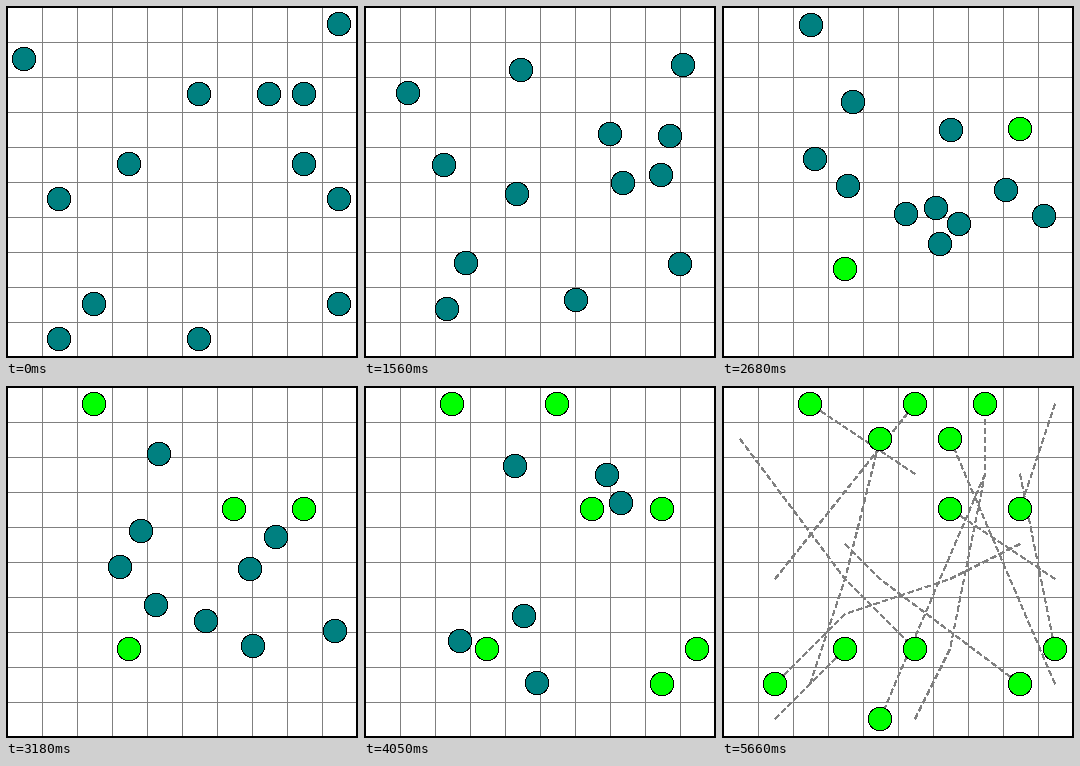
Recreate the animation shown at these times as a matplotlib script. Size 352 px wide and 352 px high, loop 8570 ms.

```python
import numpy as np
import matplotlib.pyplot as plt
from matplotlib.animation import FuncAnimation
from matplotlib.collections import LineCollection

SIZE, DPI, CELL, CELLS = 352, 88, 35, 10
PX = 72 / DPI            # one pixel in points
LOOP, TICK = 8570, 10    # ms
START, WALK = 980, 4350  # ms, pause before the walk and its length
PATHS_AT = 5660          # ms, when the routes appear
STRIDE = 2.393           # pixels walked per step
GRAY, TEAL, LIME = "#808080", "#008080", "#00ff00"

# Start, turning points and goal of each agent as (column, row) cells
ROUTES = [
    [(9, 0), (8, 3)],
    [(5, 2), (2, 0)],
    [(7, 2), (4, 9)],
    [(8, 2), (9, 7)],
    [(1, 5), (5, 0)],
    [(9, 5), (6, 3)],
    [(9, 8), (6, 1)],
    [(1, 9), (3, 7)],
    [(0, 1), (3, 5), (5, 7)],
    [(3, 4), (4, 5), (8, 8)],
    [(2, 8), (3, 5), (4, 1)],
    [(8, 4), (6, 5), (3, 6), (1, 8)],
    [(5, 9), (6, 7), (7, 2), (7, 0)],
]


class Agent:
    def __init__(self, route):
        self.path = 18 + CELL * np.array(route, float)
        legs = np.hypot(*np.diff(self.path, axis=0).T)
        self.marks = np.r_[0, np.cumsum(legs)]

    def place(self, dist):
        spot = [np.interp(dist, self.marks, axis) for axis in self.path.T]
        return np.floor(np.array(spot) + 0.5)

    def color(self, dist):
        return LIME if dist >= self.marks[-1] else TEAL


def walked(t):
    """Distance covered by time t; the steps quicken very slightly."""
    if t < START:
        return 0
    s = (t - START) / WALK
    return STRIDE * int(1.7 + 128 * s + 6 * s * s)


fig = plt.figure(figsize=(SIZE / DPI, SIZE / DPI), dpi=DPI, facecolor="white")
ax = fig.add_axes([0, 0, 1, 1])
ax.set_xlim(0, SIZE)
ax.set_ylim(SIZE, 0)
ax.axis("off")


def grid(at, color, width, zorder):
    style = dict(colors=color, linewidths=width * PX, antialiaseds=False, zorder=zorder)
    ax.vlines(at, 0, SIZE, **style)
    ax.hlines(at, 0, SIZE, **style)


def disks(diameter, color, zorder):
    spots = np.array([a.path[0] for a in agents])
    return ax.scatter(*spots.T, s=(diameter * PX) ** 2, c=[color] * len(agents),
                      linewidths=0, antialiaseds=False, zorder=zorder)


agents = [Agent(route) for route in ROUTES]

grid(1 + CELL * np.arange(1, CELLS), GRAY, 1, 1)
grid([1, SIZE - 1], "black", 2, 2)

# Without smoothing every touched pixel is filled, so thin strokes look wider
trails = LineCollection([a.path for a in agents], colors=GRAY, linewidths=PX,
                        linestyles=[(0, (5, 3))], antialiaseds=False, zorder=3)
ax.add_collection(trails, autolim=False)

rims = disks(23, "black", 4)
cores = disks(21, TEAL, 5)


def draw(i):
    t = i * TICK
    dist = walked(t)
    spots = [a.place(dist) for a in agents]
    rims.set_offsets(spots)
    cores.set_offsets(spots)
    cores.set_facecolor([a.color(dist) for a in agents])
    trails.set_visible(t >= PATHS_AT)
    return trails, rims, cores


anim = FuncAnimation(fig, draw, frames=LOOP // TICK, interval=TICK,
                     repeat=True, repeat_delay=0, blit=False)
plt.show()
```
